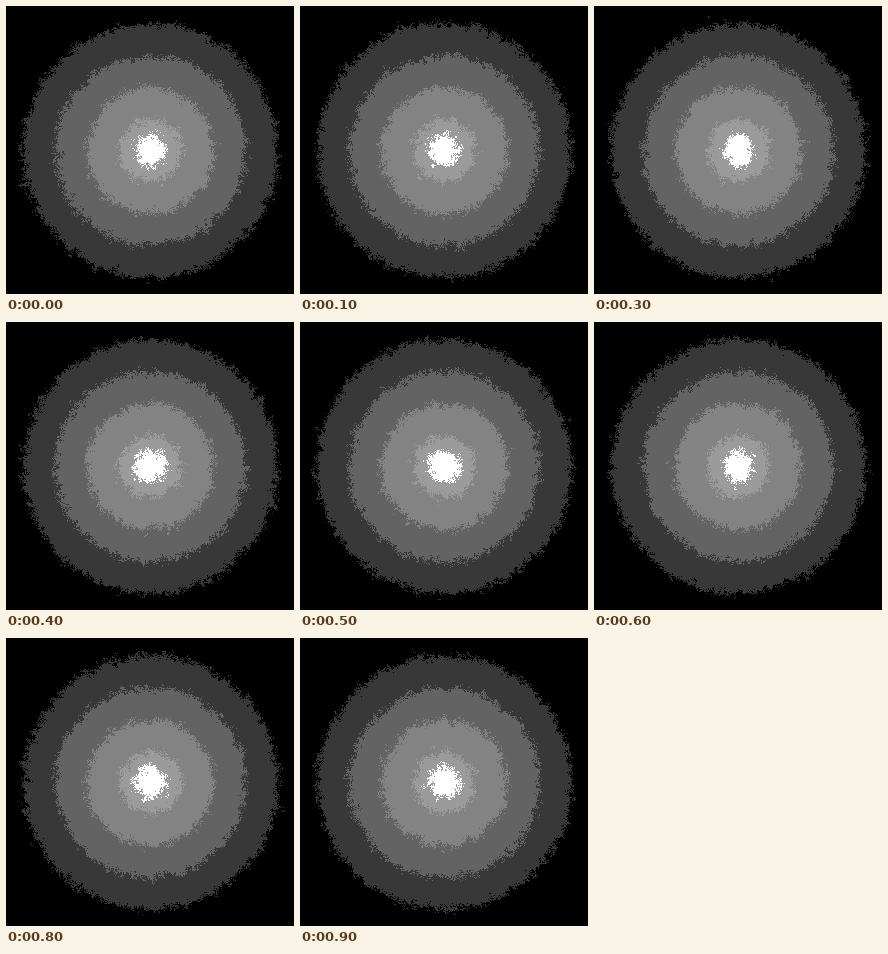
Write an HTML page with a canvas that moves like this. It is 288x288 px and loops after 1 s.

```html
<!DOCTYPE html>
<html lang="en">
<head>
<meta charset="utf-8">
<title>Flickering glow</title>
<style>
  html, body { margin: 0; width: 100%; height: 100%; overflow: hidden; background: #000; }
  canvas { display: block; width: 288px; height: 288px; image-rendering: pixelated; }
</style>
</head>
<body>
<canvas id="stage" width="288" height="288"></canvas>
<script>
const SIZE = 288, CENTER = 144.5, STEPS = 10, STEP_MS = 100, PASSES = 12;
// Radius and grey level, from the core outwards
const RINGS = [[15.8, 255], [31, 155], [63, 131], [95, 99], [127, 56]];

const ctx = document.getElementById('stage').getContext('2d');

function seeded(seed) {
  let s = seed >>> 0;
  return () => {
    s = (s + 0x6D2B79F5) >>> 0;
    let t = Math.imul(s ^ (s >>> 15), s | 1);
    t ^= t + Math.imul(t ^ (t >>> 7), t | 61);
    return ((t ^ (t >>> 14)) >>> 0) / 4294967296;
  };
}

function cleanDiscs() {
  const grey = new Uint8Array(SIZE * SIZE);
  for (let y = 0; y < SIZE; y++) {
    for (let x = 0; x < SIZE; x++) {
      const r = Math.hypot(x + 0.5 - CENTER, y + 0.5 - CENTER);
      const ring = RINGS.find(([radius]) => r < radius);
      grey[y * SIZE + x] = ring ? ring[1] : 0;
    }
  }
  return grey;
}

// Every pixel takes the value of a random neighbour, several times over
function fray(grey, rand) {
  for (let pass = 0; pass < PASSES; pass++) {
    const next = new Uint8Array(grey.length);
    for (let y = 1; y < SIZE - 1; y++) {
      for (let x = 1; x < SIZE - 1; x++) {
        const pick = Math.floor(rand() * 9);
        const dx = pick % 3 - 1, dy = Math.floor(pick / 3) - 1;
        next[y * SIZE + x] = grey[(y + dy) * SIZE + x + dx];
      }
    }
    grey = next;
  }
  return grey;
}

function toImage(grey) {
  const image = ctx.createImageData(SIZE, SIZE);
  grey.forEach((v, i) => image.data.set([v, v, v, 255], i * 4));
  return image;
}

const discs = cleanDiscs();
const images = Array.from({ length: STEPS }, (_, i) =>
  toImage(fray(discs, seeded(1013 + i * 7919))));

const start = performance.now();
let shown = -1;

function draw(now) {
  const step = Math.floor(Math.max(0, now - start) / STEP_MS) % STEPS;
  if (step !== shown) {
    ctx.putImageData(images[step], 0, 0);
    shown = step;
  }
  requestAnimationFrame(draw);
}
draw(start);
</script>
</body>
</html>
```
